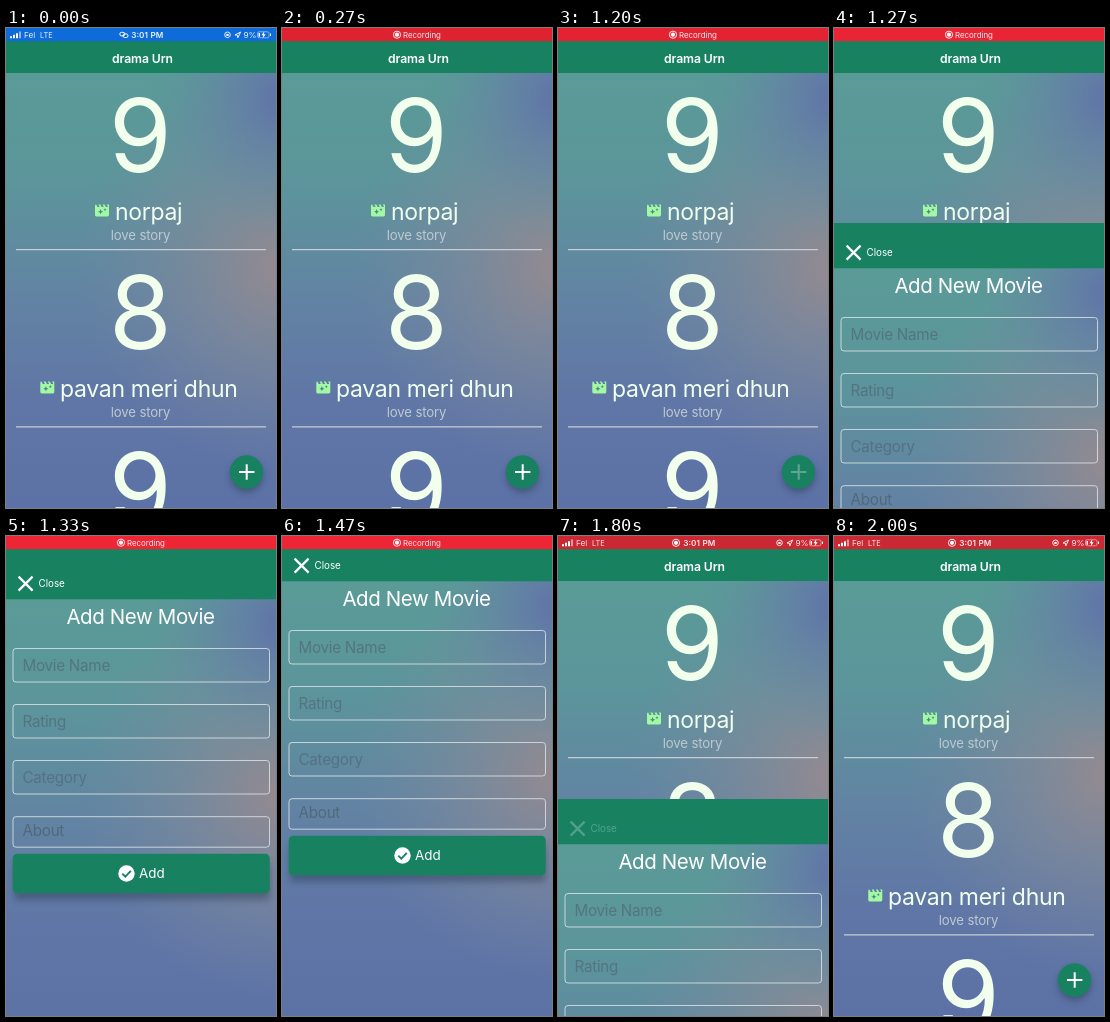
Animation, 270 px wide and 480 px high, one loop 2070 ms. Source, as an HTML page:

```html
<!DOCTYPE html>
<html lang="en">
<head>
<meta charset="utf-8">
<title>Movie list</title>
<style>
  html, body { margin: 0; width: 100%; height: 100%; overflow: hidden; }
  svg { display: block; width: 100vw; height: 100vh; }
  text { font-family: Inter, Roboto, "Liberation Sans", sans-serif; fill: #fff; }
  .mid { text-anchor: middle; }
  .green { fill: #188260; }
  .line { fill: none; stroke: #fff; }
  .rating { font-size: 101.5px; fill: #f1ffec; }
  .name { font-size: 23px; letter-spacing: -.3px; fill: #f1fff1; }
  .genre { font-size: 13.2px; letter-spacing: -.15px; fill: #bdc9d0; }
  .rule { stroke: #c6cdd4; stroke-width: 1.2; }
  .heading { font-size: 12.2px; font-weight: 600; letter-spacing: -.1px; }
  .small { font-size: 8.2px; fill-opacity: .9; }
  .clock { font-weight: 600; word-spacing: .6px; }
  .title { font-size: 20.5px; letter-spacing: -.4px; }
  .field { fill: none; stroke: #d9e2e6; stroke-opacity: .85; }
  .hint { font-size: 15.2px; letter-spacing: -.25px; fill: #50697a; fill-opacity: .75; }

  .bar, .time, .rec, .link, .dot, .plus, .sheet, .close { animation: 2070ms linear infinite; }
  .bar { animation-name: bar; }
  .time { animation-name: time; }
  .rec { animation-name: rec; }
  .link { animation-name: link; }
  .dot { animation-name: dot; }
  .plus { animation-name: plus; }
  .sheet { animation-name: sheet; }
  .close { animation-name: close; }
  .link, .dot, .plus, .sheet, .close { animation-timing-function: step-end; }

  @keyframes bar {
    0%, 3.3% { fill: #0f6bd9; }
    9.6%, 54.5% { fill: #de2230; }
    64.2%, 77.2% { fill: #ee2535; }
    80.6%, 100% { fill: #ca2832; }
  }
  @keyframes time {
    0%, 3.3% { opacity: 1; }
    6.4%, 77.2% { opacity: 0; }
    80.6%, 100% { opacity: 1; }
  }
  @keyframes rec {
    0%, 6.4% { opacity: 0; }
    9.6%, 77.2% { opacity: 1; }
    80.6%, 100% { opacity: 0; }
  }
  @keyframes link { 0% { opacity: 1; } 40%, 100% { opacity: 0; } }
  @keyframes dot { 0% { opacity: 0; } 40%, 100% { opacity: 1; } }
  @keyframes plus {
    0% { opacity: 1; }
    54.5% { opacity: .6; }
    57.9% { opacity: .3; }
    71%, 100% { opacity: 1; }
  }
  @keyframes sheet {
    0% { transform: translateY(480px); }
    61.3% { transform: translateY(195px); }
    64.2% { transform: translateY(18px); }
    67.6% { transform: translateY(1px); }
    71% { transform: translateY(0); }
    86.9% { transform: translateY(263px); }
    90.3% { transform: translateY(460px); }
    93.2% { transform: translateY(479px); }
    96.6%, 100% { transform: translateY(480px); }
  }
  @keyframes close {
    0% { opacity: 1; }
    80.6% { opacity: .6; }
    83.5%, 100% { opacity: .25; }
  }
</style>
</head>
<body>
<svg viewBox="0 0 270 480">
  <defs>
    <linearGradient id="base" x2="0" y2="1">
      <stop offset="0" stop-color="#5a9b97"/>
      <stop offset=".25" stop-color="#5c959b"/>
      <stop offset=".52" stop-color="#6283a3"/>
      <stop offset=".75" stop-color="#6076a6"/>
      <stop offset="1" stop-color="#5c72a6"/>
    </linearGradient>
    <radialGradient id="warm" gradientUnits="userSpaceOnUse" cx="275" cy="240" r="205">
      <stop offset="0" stop-color="#988a8f" stop-opacity=".95"/>
      <stop offset=".45" stop-color="#838a99" stop-opacity=".62"/>
      <stop offset="1" stop-color="#7688a0" stop-opacity="0"/>
    </radialGradient>
    <radialGradient id="cool" gradientUnits="userSpaceOnUse" cx="280" cy="70" r="140">
      <stop offset="0" stop-color="#5f70a9"/>
      <stop offset=".4" stop-color="#647fa6" stop-opacity=".7"/>
      <stop offset="1" stop-color="#6490a0" stop-opacity="0"/>
    </radialGradient>
    <filter id="blur" x="-30%" y="-50%" width="160%" height="200%">
      <feGaussianBlur stdDeviation="3.5"/>
    </filter>
    <g id="backdrop">
      <rect y="45" width="270" height="435" fill="url(#base)"/>
      <rect y="45" width="270" height="435" fill="url(#warm)"/>
      <rect y="45" width="270" height="435" fill="url(#cool)"/>
    </g>
    <g id="film">
      <path fill="#a2f9a4" d="M0 1.2Q0 0 1.2 0L2.4 2.4H4.6L3.4 0H5.4L6.6 2.4H8.8L7.6 0H9.6L10.8 2.4H13L11.8 0H14V10.6Q14 12 12.6 12H1.4Q0 12 0 10.6Z"/>
      <path fill="#55808d" d="M5.6 4.6L6.4 6.4L8.2 7.2L6.4 8L5.6 9.8L4.8 8L3 7.2L4.8 6.4ZM10 3.6L10.5 4.7L11.6 5.2L10.5 5.7L10 6.8L9.5 5.7L8.4 5.2L9.5 4.7Z"/>
    </g>
    <g id="record">
      <circle class="line" r="3.6" stroke-width=".9"/>
      <circle r="2.1" fill="#fff"/>
    </g>
  </defs>

  <!-- List -->
  <use href="#backdrop"/>
  <g>
    <text class="rating mid" x="134.2" y="143.8">9</text>
    <use href="#film" x="89" y="176.5"/>
    <text class="name" x="109" y="192">norpaj</text>
    <text class="genre mid" x="134.5" y="211.5">love story</text>
    <path class="rule" d="M10 221.7H260"/>
  </g>
  <g>
    <text class="rating mid" x="134.5" y="320.8">8</text>
    <use href="#film" x="34.3" y="353.5"/>
    <text class="name" x="54" y="369">pavan meri dhun</text>
    <text class="genre mid" x="134.5" y="388.5">love story</text>
    <path class="rule" d="M10 398.8H260"/>
  </g>
  <text class="rating mid" x="134.2" y="497.8">9</text>

  <circle cx="240.5" cy="448" r="16.5" fill="#1d2c40" opacity=".4" filter="url(#blur)"/>
  <circle class="green" cx="240.5" cy="444" r="16.7"/>
  <path class="line plus" stroke-width="2" d="M233 444H248.4M240.7 436.3V451.7"/>

  <rect class="green" width="270" height="45"/>
  <text class="heading mid" x="136.5" y="35">drama Urn</text>

  <!-- Form sheet -->
  <g class="sheet">
    <use href="#backdrop"/>
    <rect class="green" width="270" height="45.3"/>
    <g class="close">
      <path class="line" stroke-width="2.2" d="M12.6 22.6L26.6 36.6M26.6 22.6L12.6 36.6"/>
      <text x="32.5" y="33" font-size="9.8">Close</text>
    </g>
    <text class="title mid" x="134.5" y="70">Add New Movie</text>
    <rect class="field" x="7" y="94.5" width="256.5" height="33.5" rx="3"/>
    <text class="hint" x="16.5" y="117">Movie Name</text>
    <rect class="field" x="7" y="150.5" width="256.5" height="33.5" rx="3"/>
    <text class="hint" x="16.5" y="173">Rating</text>
    <rect class="field" x="7" y="206.5" width="256.5" height="33.5" rx="3"/>
    <text class="hint" x="16.5" y="229">Category</text>
    <rect class="field" x="7" y="262.7" width="256.5" height="30.5" rx="3"/>
    <text class="hint" x="16.5" y="282" style="fill-opacity:1">About</text>
    <rect x="8" y="308" width="256" height="38" rx="4" fill="#22334a" opacity=".4" filter="url(#blur)"/>
    <rect class="green" x="6.7" y="299.8" width="257" height="39.4" rx="4.5"/>
    <circle cx="120.5" cy="319.5" r="8.2" fill="#fff"/>
    <path d="M116.3 319.7L119.3 322.7L124.8 316.8" fill="none" stroke="#188260" stroke-width="1.9"/>
    <text x="133" y="323.5" font-size="13.4">Add</text>
  </g>

  <!-- Status bar -->
  <rect class="bar" width="270" height="13.2"/>
  <g class="time">
    <path fill="#fff" d="M4 8.2H6V10.2H4ZM7 6.8H9V10.2H7ZM10 5.2H12V10.2H10Z"/>
    <path fill="#fff" opacity=".5" d="M13 3.6H15V10.2H13Z"/>
    <text class="small" x="18" y="10">Fel</text>
    <text class="small" x="34" y="10" style="font-size:7.4px">LTE</text>
    <g class="link line" stroke-width="1">
      <rect x="113.8" y="4.3" width="5" height="3.6" rx="1.8"/>
      <rect x="117" y="5.9" width="5" height="3.6" rx="1.8"/>
    </g>
    <g class="dot"><use href="#record" x="118" y="6.8"/></g>
    <text class="small clock mid" x="141.3" y="9.8">3:01 PM</text>
    <circle class="line" cx="221.5" cy="6.8" r="2.8" stroke-width=".9"/>
    <rect x="220.3" y="5.9" width="2.4" height="2" fill="#fff"/>
    <path class="line" stroke-width=".9" d="M229 7L234.6 4L231.8 9.8L231.4 7.2Z"/>
    <text class="small" x="237.5" y="9.8">9%</text>
    <rect class="line" x="251.5" y="3.8" width="11.5" height="6" rx="1.6" stroke-width=".8" opacity=".6"/>
    <path fill="#fff" d="M252.5 5H254V8.8H252.5ZM264 5.6H265V8H264ZM258.4 3.2L255.4 7.3H257.3L256.6 10.4L259.7 6.3H257.8Z"/>
  </g>
  <g class="rec">
    <use href="#record" x="115" y="6.7"/>
    <text x="121" y="9.7" font-size="7.9" fill-opacity=".9">Recording</text>
  </g>
</svg>
</body>
</html>
```
